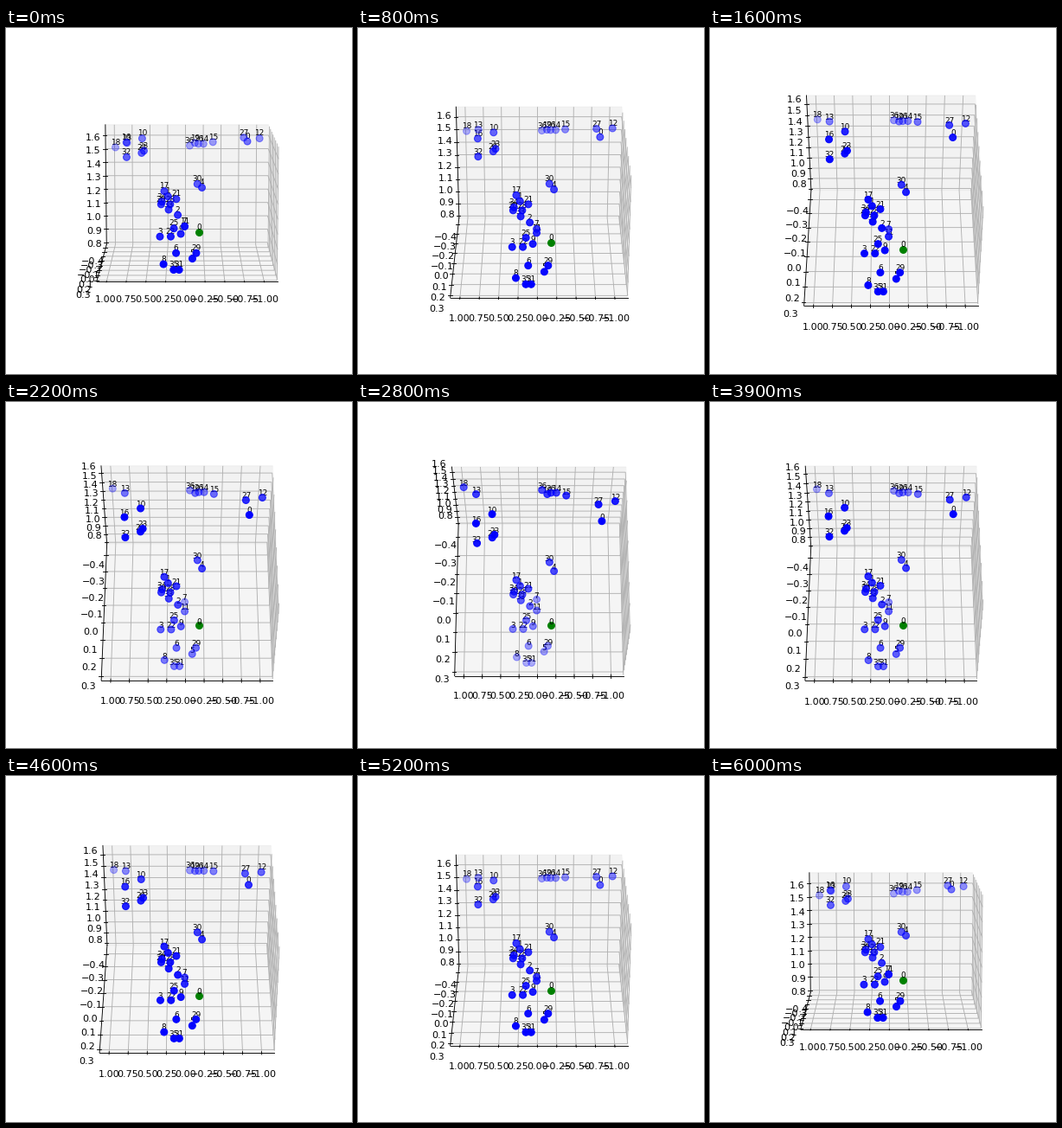
A matplotlib script that plays this animation: 400 by 400 pixels, repeating every 6100 ms.

```python
import numpy as np
import matplotlib.pyplot as plt
from matplotlib.animation import FuncAnimation
from matplotlib.ticker import MultipleLocator

FRAMES = 61
INTERVAL = 100
LOW, TILT_STEP = 10, 2
LABEL_LIFT = 0.02

# Plan position (x, y) of each node; its place in the list is its label.
PLAN = np.array([
    (-.84, -.22), (.23, 0), (.10, .07), (.33, .15), (-.22, -.06), (-.09, .23),
    (.12, .21), (.01, .01), (.28, .25), (.06, .14), (.59, -.25), (.01, .07),
    (-1.02, -.32), (.81, -.37), (-.25, -.38), (-.38, -.36), (.80, -.21),
    (.28, -.02), (.98, -.42), (-.13, -.37), (.32, .03), (.12, .01),
    (.19, .15), (.56, -.17), (.59, -.16), (.15, .12), (-.18, -.38),
    (-.80, -.30), (.20, .03), (-.14, .21), (-.16, -.10), (.08, .27),
    (.79, -.14), (.22, .05), (.31, .02), (.15, .27), (-.06, -.40),
])
HUB = np.array([(-.18, .14, 1.06)])


def sheet(y):
    """Height of the curved sheet the nodes lie on: a steep ramp with a crest."""
    return np.interp(y, [-.42, -.31, -.25, -.21, -.14, -.10, -.02, .27],
                     [1.52, 1.615, 1.62, 1.60, 1.51, 1.33, 1.30, .845])


nodes = np.column_stack([PLAN, sheet(PLAN[:, 1])])
nodes[[7, 11], 2] -= (.19, .08)  # these two hang below the sheet

fig = plt.figure(figsize=(5, 5), dpi=80)
ax = fig.add_subplot(projection="3d")


def add_points(points, color):
    ax.scatter(*points.T, c=color, marker="o", s=50)
    for label, (x, y, z) in enumerate(points):
        ax.text(x, y, z + LABEL_LIFT, str(label), fontsize=8, ha="center")


add_points(nodes, "blue")
add_points(HUB, "green")

ax.set(xlim=(-1.166, 1.126), ylim=(-.47, .32), zlim=(.783, 1.677))
for axis, step in ((ax.xaxis, .25), (ax.yaxis, .1), (ax.zaxis, .1)):
    axis.set_major_locator(MultipleLocator(step))


def update(i):
    # Tilt up at a steady rate, then back down. The azimuth stays a hair
    # under 90 so that the right-hand wall is always the one drawn.
    ax.view_init(elev=LOW + TILT_STEP * min(i, FRAMES - 1 - i), azim=90 - 1e-6)
    return []


anim = FuncAnimation(fig, update, frames=FRAMES, interval=INTERVAL,
                     init_func=lambda: update(0), repeat=True)
plt.show()
```
